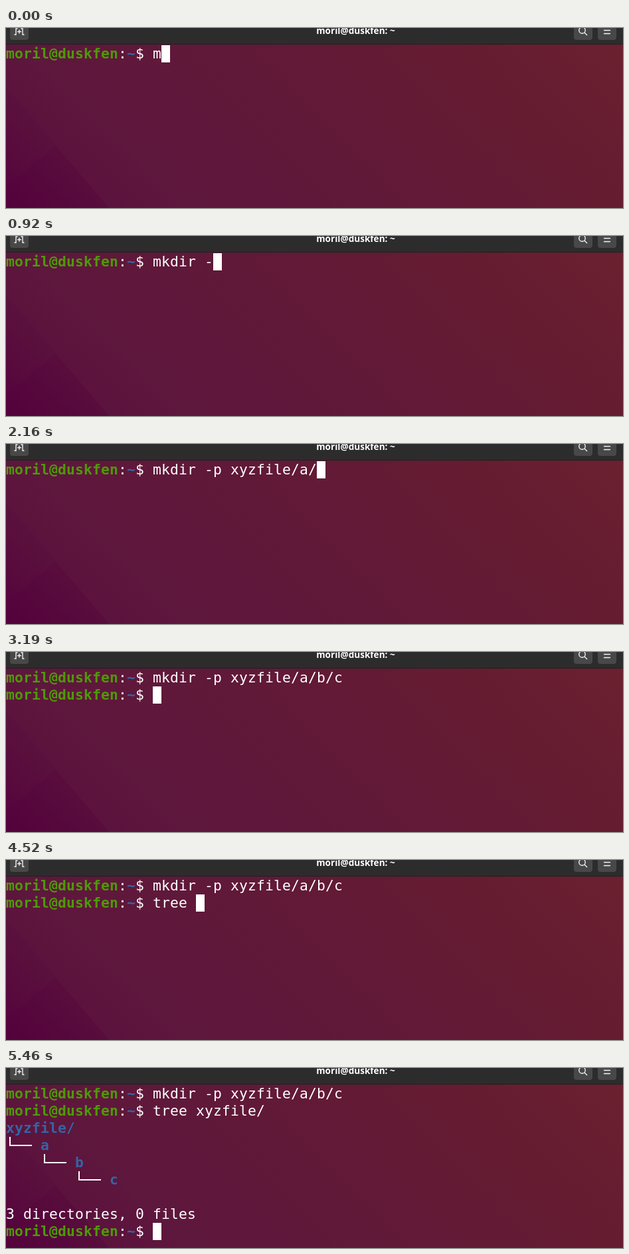
An HTML page for the animation above (6.07 s loop, 929 by 272 pixels).

```html
<!DOCTYPE html>
<html lang="en">
<head>
<meta charset="utf-8">
<title>Terminal</title>
<style>
  html, body { margin: 0; width: 100%; height: 100%; overflow: hidden; background: #2c2c2c; }
  svg { display: block; width: 100%; height: 100%; }
  #screen text { font: 21.33px "DejaVu Sans Mono", monospace; fill: #fff; white-space: pre; }
  #screen .user { font-weight: 700; fill: #4e9a06; }
  #screen .dir { font-weight: 700; fill: #3465a4; }
  .title { font: 700 13.6px "Noto Sans", "Open Sans", sans-serif; fill: #fff; text-anchor: middle; }
  .button { fill: #484848; }
  .icon { fill: none; stroke: #f2f2f2; stroke-width: 1.4; }
</style>
</head>
<body>
<svg viewBox="0 0 929 272">
  <defs>
    <linearGradient id="wall" gradientUnits="userSpaceOnUse" x1="0" y1="272" x2="600" y2="-328">
      <stop offset="0" stop-color="#56023f"/>
      <stop offset=".13" stop-color="#5b123d"/>
      <stop offset=".23" stop-color="#5e173d"/>
      <stop offset=".5" stop-color="#611938"/>
      <stop offset=".77" stop-color="#651c31"/>
      <stop offset="1" stop-color="#6b212f"/>
    </linearGradient>
  </defs>
  <rect width="929" height="272" fill="url(#wall)"/>
  <path d="M0 90L75 178L0 240Z" fill="#500038" opacity=".12"/>
  <path d="M0 240L75 178L155 272H0Z" fill="#500038" opacity=".3"/>

  <rect width="929" height="25" fill="#2c2c2c"/>
  <rect y="24" width="929" height="1" fill="#202020"/>
  <g class="button">
    <rect x="6" y="-10" width="28" height="28" rx="4"/>
    <rect x="855" y="-10" width="28" height="28" rx="4"/>
    <rect x="891" y="-10" width="28" height="28" rx="4"/>
  </g>
  <g class="icon">
    <path d="M12.5 10H15V1H17.500M27.500 10H25V1H22.500M17 5.500H23M20 2.500V8.500"/>
    <circle cx="867.500" cy="3.500" r="4.700"/>
    <path d="M871 7L875 11M900 3.500H910M900 8.500H910"/>
  </g>
  <text id="title" class="title" x="526.5" y="9"></text>
  <g id="screen"></g>
</svg>
<script>
const LOOP = 6070, CELL = 13, LINE = 26, TOP = 26, BASELINE = 20;
const USER = 'moril@duskfen';
const PROMPT_LENGTH = USER.length + 4;

// Each entry appends to the input; an empty string blinks the cursor off.
const keys = [
  [0, 'm'], [230, 'k'], [400, 'd'], [550, ''], [630, 'i'], [710, 'r '],
  [920, '-'], [1070, 'p'], [1300, ' '], [1380, ''], [1460, 'x'],
  [1680, 'y'], [1760, 'z'], [1840, 'file/'], [2010, 'a'], [2160, '/'],
  [2390, 'b'], [2790, '/'], [2940, 'c'], [3190, '\n'], [3510, ''],
  [3760, 't'], [3990, 'r'], [4220, 'e'], [4370, 'e'], [4520, ' '],
  [4600, ''], [4680, 'x'], [5080, 'yzfile/'], [5380, '\n'], [5460, '\n']
];

const screen = document.getElementById('screen');
document.getElementById('title').textContent = USER + ': ~';

function print(row, col, text, style = '') {
  const xs = [...text].map((_, i) => (col + i) * CELL).join(' ');
  return `<text class="${style}" x="${xs}" y="${TOP + row * LINE + BASELINE}">${text}</text>`;
}

function prompt(row, command) {
  const n = USER.length;
  return print(row, 0, USER, 'user') + print(row, n, ':') +
    print(row, n + 1, '~', 'dir') + print(row, n + 2, '$ ' + command);
}

function branch(row, col, name) {
  const x = col * CELL + 6, y = TOP + row * LINE;
  return `<path d="M${x} ${y}v13h33" fill="none" stroke="#fff" stroke-width="2"/>` +
    print(row, col + 4, name, 'dir');
}

function cursor(row, col) {
  return `<rect x="${col * CELL}" y="${TOP + row * LINE}" width="${CELL}" height="${LINE}" fill="#fff"/>`;
}

function treeOutput() {
  return print(2, 0, 'xyzfile/', 'dir') +
    branch(3, 0, 'a') + branch(4, 4, 'b') + branch(5, 8, 'c') +
    print(7, 0, '3 directories, 0 files') + prompt(8, '');
}

function render(count) {
  const pressed = keys.slice(0, count).map(key => key[1]);
  const lines = pressed.join('').split('\n');
  const last = lines.length - 1;
  let out = lines.slice(0, 2).map((line, row) => prompt(row, line)).join('');
  if (last === 3) out += treeOutput() + cursor(8, PROMPT_LENGTH);
  else if (last === 2) out += cursor(2, 0);
  else if (pressed[count - 1]) out += cursor(last, PROMPT_LENGTH + lines[last].length);
  screen.innerHTML = out;
}

let shown = 0;
const start = performance.now();

function tick() {
  const time = Math.max(0, performance.now() - start) % LOOP;
  const count = keys.filter(key => key[0] <= time).length;
  if (count !== shown) render(shown = count);
  requestAnimationFrame(tick);
}
tick();
</script>
</body>
</html>
```
